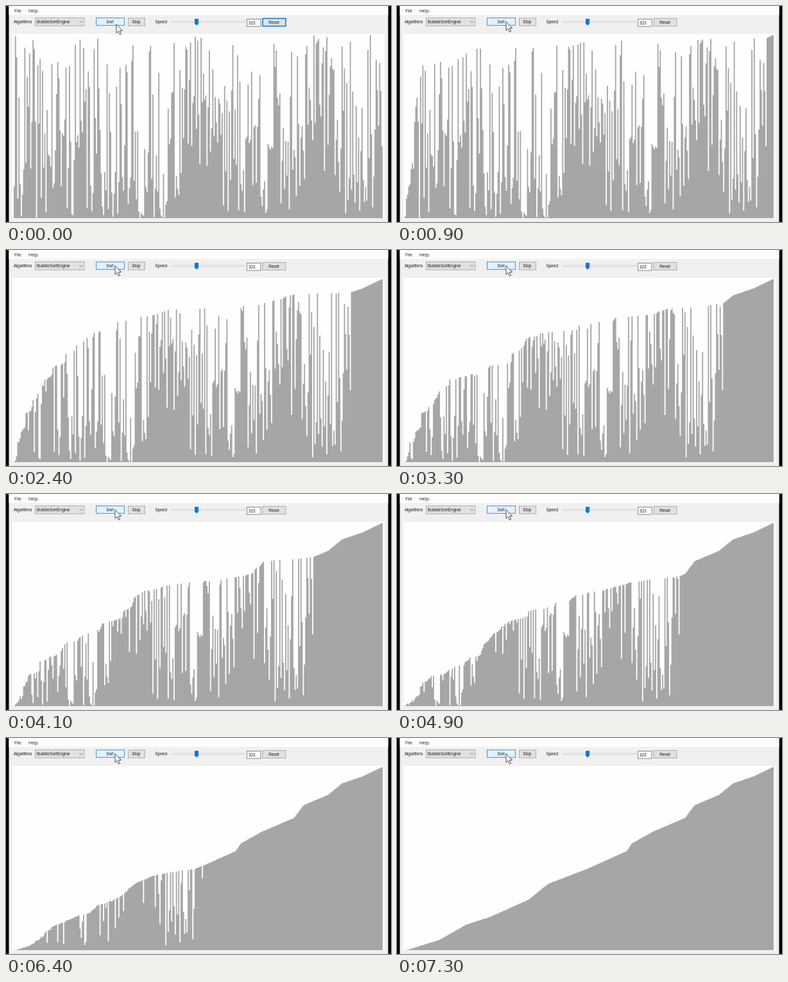
Recreate the animation shown at these times as an HTML page. Size 600x338 px, loop 7400 ms.

```html
<!DOCTYPE html>
<html lang="en">
<head>
<meta charset="utf-8">
<title>Bubble sort</title>
<style>
  html, body { margin: 0; width: 100%; height: 100%; overflow: hidden; background: #000; }
  svg { display: block; width: 600px; height: 338px; }
  text { font: 6.4px "Liberation Sans", Arial, sans-serif; fill: #1a1a1a; }
  .menu { font: 6.9px "Open Sans", "Noto Sans", sans-serif; }
  .mid { text-anchor: middle; }
  .button { fill: #e1e1e1; stroke: #adadad; }
  .hover { fill: #e5f1fb; stroke: #3c92d8; }
  .focus { stroke: #0078d7; stroke-width: 1.5; }
</style>
</head>
<body>
<svg viewBox="0 0 600 338">
  <rect x="4.5" width="591" height="338" fill="#f0f0f0"/>
  <rect x="4.5" width="591" height="14" fill="#fdfdfd"/>
  <text class="menu" x="13" y="9.5">File</text>
  <text class="menu" x="35" y="9.5">Help</text>

  <text x="12" y="27" letter-spacing="-.2">Algorithms</text>
  <rect class="button" x="45.5" y="18.5" width="76.5" height="12.5"/>
  <text x="48" y="27.2">BubbleSortEngine</text>
  <path d="M114.5 23.5l2.3 2.3 2.3-2.3" fill="none" stroke="#555" stroke-width=".8"/>

  <rect class="button hover" x="140.5" y="18.7" width="44" height="11.6"/>
  <text class="mid" x="162" y="26.6">Sort</text>
  <rect class="button" x="190.5" y="19" width="26" height="12"/>
  <text class="mid" x="202.8" y="27.2">Stop</text>

  <text x="232.5" y="27">Speed</text>
  <rect x="258.5" y="23.8" width="114" height="2.2" fill="#e4e6e6" stroke="#d2d2d2" stroke-width=".6"/>
  <path d="M294 20h6v7.5l-3 3-3-3z" fill="#0078d7"/>
  <rect x="375.5" y="20.5" width="21.5" height="11.5" fill="#fff" stroke="#858585"/>
  <text x="378" y="28.8">323</text>
  <rect id="reset" class="button" x="400" y="19.5" width="36" height="12"/>
  <text class="mid" x="417.5" y="27.6">Reset</text>

  <rect x="10" y="43.5" width="580" height="289" fill="#fefefe"/>
  <path id="bars" fill="#a6a6a6"/>
  <path id="cursor" d="M0 0V13.8L3.1 10.9L5.3 16.2L7.5 15.2L5.3 10.1H9.6Z"
        fill="#fff" stroke="#222" stroke-width=".8"/>
</svg>
<script>
const COUNT = 314, LEFT = 12, RIGHT = 587, BASE = 332;
const STEP = (RIGHT - LEFT) / COUNT;
const LOOP = 7400, TICK = 100, CLICK = 350, DONE = 6950;
const byId = id => document.getElementById(id);
const barX = i => LEFT + i * STEP;

// Key points of the sorted outline: x, top
const outline = [[12, 332], [18, 331], [66, 316], [108, 292], [145, 280], [205, 253],
  [236, 228], [296, 205], [358, 177], [366, 165], [398, 147], [449, 125], [464, 105],
  [502, 89], [524, 71], [556, 60], [587, 45]];

function outlineAt(x) {
  const n = outline.findIndex(point => point[0] >= x);
  const [x0, y0] = outline[n - 1], [x1, y1] = outline[n];
  return y0 + (y1 - y0) * (x - x0) / (x1 - x0);
}

let seed = 41;
function random() {
  seed = (seed * 1664525 + 1013904223) >>> 0;
  return seed / 4294967296;
}

// Two dense regions of the shuffled start and a sparse one between the edges
const bump = (x, centre) => Math.exp(-(((x - centre) / 32) ** 2));
const tilt = x => 1.7 * (bump(x, 300) + bump(x, 487)) - bump(x, 225);

function shuffledTops() {
  const tops = [];
  Array.from({ length: COUNT }, (_, i) => ({ i, key: random() ** (2 ** -tilt(barX(i))) }))
    .sort((a, b) => a.key - b.key)
    .forEach(({ i }, rank) => { tops[i] = outlineAt(barX(rank + .5)); });
  return tops;
}

// Bubble sort that stops after a number of swaps
function sortBars(tops, limit) {
  const a = tops.slice();
  let swaps = 0;
  for (let end = COUNT - 1; end > 0; end--) {
    for (let i = 0; i < end; i++) {
      if (a[i] >= a[i + 1]) continue;
      if (swaps >= limit) return { a, swaps };
      [a[i], a[i + 1]] = [a[i + 1], a[i]];
      swaps++;
    }
  }
  return { a, swaps };
}

const start = shuffledTops();
const total = sortBars(start, Infinity).swaps;

function draw(t) {
  // Every swap takes the same time
  const done = Math.min(Math.max((t - CLICK) / (DONE - CLICK), 0), 1);
  const steps = sortBars(start, Math.round(done * total)).a
    .map((top, i) => `V${top.toFixed(1)}H${barX(i + 1).toFixed(2)}`);
  byId("bars").setAttribute("d", `M${LEFT} ${BASE}${steps.join("")}V${BASE}Z`);
  byId("reset").classList.toggle("focus", t < CLICK);
  const move = Math.min(t / 300, 1);
  byId("cursor").setAttribute("transform", `translate(${172 - 2 * move} ${28.5 - 4 * move})`);
}

let shown = -1;
const begin = performance.now();
function frame() {
  const tick = Math.floor((performance.now() - begin) % LOOP / TICK);
  if (tick !== shown) draw((shown = tick) * TICK);
  requestAnimationFrame(frame);
}
frame();
</script>
</body>
</html>
```
